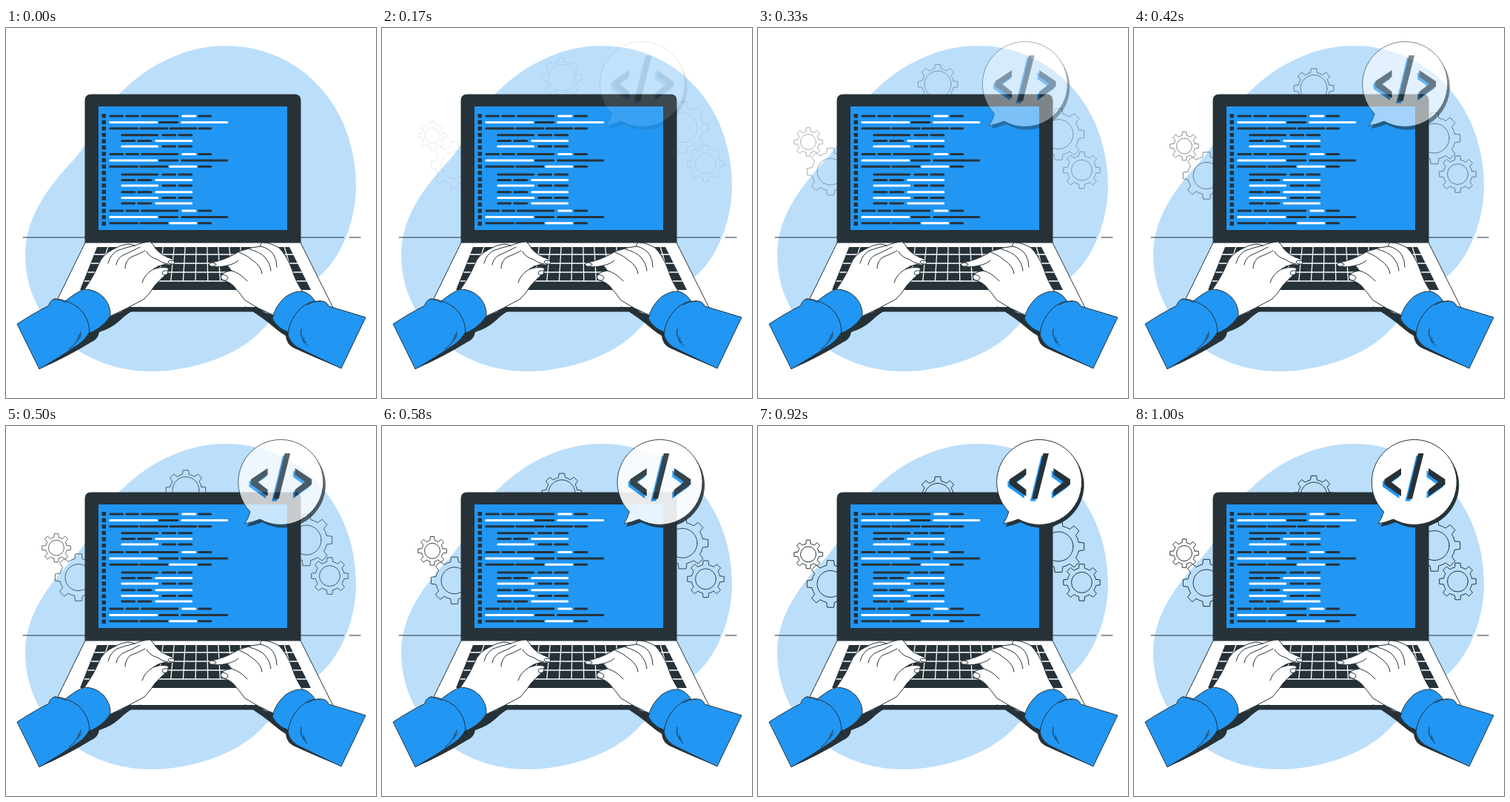
Animation, 500 px wide and 500 px high, one loop 1.04 s. Source, as an HTML page:

```html
<!DOCTYPE html>
<html lang="en">
<head>
<meta charset="utf-8">
<title>Typing on a laptop</title>
<style>
  html, body { margin: 0; width: 100%; height: 100%; overflow: hidden; background: #fff; }
  svg { display: block; width: 100%; height: 100%; }
  .dark { fill: #263238; }
  .blue { fill: #2196f3; }
  .line { fill: none; stroke: #263238; stroke-width: 1; stroke-linecap: round; stroke-linejoin: round; }
  .skin { fill: #fff; stroke: #263238; stroke-width: 1; stroke-linejoin: round; }
  .cloth { fill: #2196f3; stroke: #263238; stroke-width: 1; stroke-linejoin: round; }
</style>
</head>
<body>
<svg viewBox="0 0 500 500">
  <defs>
    <path id="balloon" d="M337.5 116 A57.5 57.5 0 1 1 350.5 126 Q341 130 330 132 Q335 125 337.5 116Z"/>
    <path id="glyphs" d="M361 57 L338.5 72 V79 L361 95 V86 L347.5 75.5 L361 66Z
      M384 37 H391.5 L376 98.5 H369Z
      M398 57 L420.5 72 V79 L398 95 V86 L411.5 75.5 L398 66Z"/>
  </defs>

  <path fill="#bbdefb" d="M296 24 C400 24 473 108 473 213 C473 262 452 312 423 336 C398 357 373 378 348 406
    C312 446 245 464 197 464 C100 464 26 395 26 306 C26 256 57 216 85 185 C121 149 123 114 161 81.5 C196 48 246 24 296 24Z"/>
  <path class="line" d="M23 283 H456.5 M464 283 H479"/>
  <g id="gears" class="line"></g>

  <g id="laptop">
    <path class="dark" d="M106.5 291 V98 Q106.500 89.500 115 89.500 H390 Q398.500 89.500 398.500 98 V291Z"/>
    <rect class="blue" x="125" y="106" width="255" height="167"/>
    <g id="code"></g>
    <path class="skin" d="M107 290 H398 L442 378 H64Z"/>
    <path class="dark" d="M64 377 H442 V380 Q442 383.5 438 383.5 H68 Q64 383.5 64 380Z"/>
    <path class="dark" d="M123 296 H383 L412 354 H100Z"/>
    <path id="keys" fill="none" stroke="#fff" stroke-width="1.3"/>
  </g>

  <g id="leftArm">
    <path class="dark" d="M140 388 L184 376 Q166 383 153 396 Q142 406 126 411 Q124 421 116 424 Q80 446 45 461 L110 412Z"/>
    <path class="skin" d="M104 356 Q118 337 125 320 Q130 306 145 299 Q155 293 164 292 Q170 292 174 294 Q186 289 195 289
      Q199 292 202 298 Q209 307 225 312.5 Q229 315 227.5 318 Q225 321 214 319.5 Q205 321 199 326 Q208 322 218 324 Q220 325 219 328
      Q220 332 215 334 Q208 340 201 348 Q194 359 187 366 Q166 378 140 390Z"/>
    <path class="line" d="M138 318 Q141 306 150 301 Q160 297 174 294 M149 320 Q150 312 158 307 Q170 302 181 296
      M161 325 Q161 316 168 310 Q179 306 188 301 M190 302 Q194 310 205 313 Q211 318 219 319
      M184 344 Q187 333 199 326 M219 328 Q211 327 211 331 Q212 334 215 334 M227 315 Q220 313 219 316 Q220 319 225 319"/>
    <path class="cloth" d="M80 369 Q95 357 106 353 Q121 353 132 364 Q142 376 141 389 Q135 399 126 405 Q118 411 110 413Z"/>
    <path class="cloth" d="M15 400 Q38 385 58 375 Q59 368 66 366 Q83 367 98 378 Q112 391 113 410 Q108 421 96 429 Q72 445 45 461Z"/>
    <path class="line" d="M66 366 Q74 366 81 371 M97 422 Q102 417 101 411 M85 434 Q97 426 99 414"/>
  </g>

  <g id="rightArm">
    <path class="dark" d="M322 376 L362 388 L388 412 L453 460 Q414 444 388 432 Q379 427 378 416 Q371 412 364 406 Q348 392 322 376Z"/>
    <path class="skin" d="M402 358 Q391 342 387 328 Q380 308 369 297 Q357 290 347 290 Q343 291 344 295 Q334 296 325 299
      Q315 301 308 306 Q294 314 277 317 Q273 319 276 322 Q286 324 299 321 L305 328 Q296 329 292 333
      Q288 338 294 341 Q302 343 307 348 Q315 357 323 368 Q340 379 361 388Z"/>
    <path class="line" d="M344 295 Q357 298 362 307 Q366 314 366 323 M329 299 Q344 303 350 310 Q357 318 358 328
      M315 303 Q327 308 335 315 Q345 323 346 332 M299 321 Q309 319 314 314 M305 328 Q316 331 326 342
      M292 333 Q300 334 300 338 Q299 342 294 341 M277 317 Q284 317 284 320 Q282 323 276 322"/>
    <path class="cloth" d="M418 370 Q412 359 401 356 Q390 355 378 363 Q363 376 360 393 Q364 401 373 407 Q380 411 389 413Z"/>
    <path class="cloth" d="M486 391 Q460 383 436 376 Q434 369 425 369 Q409 368 397 380 Q383 394 381 414 Q383 424 393 431 Q421 445 453 460Z"/>
    <path class="line" d="M425 369 Q415 369 407 374 M399 407 Q396 419 407 429 M402 418 Q402 423 405 425"/>
  </g>

  <g id="bubble">
    <use href="#balloon" class="dark" x="3" y="4"/>
    <use href="#balloon" class="skin"/>
    <use href="#glyphs" class="blue" x="-2.5" y="3"/>
    <use href="#glyphs" class="dark"/>
  </g>
</svg>
<script>
const DARK = '#263238', WHITE = '#fff';
const byId = id => document.getElementById(id);

function add(parent, tag, attrs) {
  const el = document.createElementNS('http://www.w3.org/2000/svg', tag);
  for (const name in attrs) el.setAttribute(name, attrs[name]);
  parent.append(el);
}

// Gears: centre, tip radius, body radius, hole radius
function gear(cx, cy, tip, body, hole) {
  const point = (r, a) => `${(cx + r * Math.cos(a)).toFixed(2)} ${(cy + r * Math.sin(a)).toFixed(2)}`;
  const points = [];
  for (let i = 0; i < 8; i++) {
    const a = i * Math.PI / 4;
    points.push(point(body, a - .21), point(tip, a - .14), point(tip, a + .14), point(body, a + .21));
  }
  let d = 'M' + points[0];
  for (let i = 1; i <= points.length; i++) {
    const next = points[i % points.length];
    d += i % 4 ? `L${next}` : `A${body} ${body} 0 0 1 ${next}`;
  }
  add(byId('gears'), 'path', { d: d + 'Z' });
  add(byId('gears'), 'circle', { cx, cy, r: hole });
}
gear(243, 94, 27, 21.5, 18);
gear(98, 212, 32, 25.5, 18);
gear(68, 172, 19.5, 14.5, 10.5);
gear(406, 161.5, 35, 28, 20);
gear(437.5, 210, 25, 19.5, 14);

// Code rows: bar ends, and one colour letter per bar
const layouts = {
  a: [140, 158, 162, 179, 183, 232, 238, 256, 260, 277],
  b: [140, 204, 207, 232, 237, 299],
  c: [140, 178, 181, 218, 221, 257, 260, 277],
  d: [156, 205, 211, 229, 233, 251],
  e: [156, 174, 178, 196, 202, 251]
};
const rows = [
  [119, 'a', 'dddwd'], [127.5, 'b', 'wdw'], [135.7, 'c', 'dddd'],
  [144.7, 'd', 'ddd'], [152.5, 'e', 'ddw'], [160, 'd', 'wdd'],
  [170.5, 'a', 'dddwd'], [179, 'b', 'wdd'], [187.3, 'c', 'ddwd'],
  [198, 'd', 'ddd'], [205.5, 'e', 'ddw'], [213, 'd', 'wdd'],
  [221.7, 'e', 'ddw'], [229.5, 'd', 'wdd'], [237, 'e', 'ddw'],
  [247, 'a', 'dddwd'], [255.5, 'b', 'wdd'], [263.8, 'c', 'ddwd']
];
rows.forEach(([y, key, tones], row) => {
  const ends = layouts[key];
  [...tones].forEach((tone, i) => add(byId('code'), 'path', {
    d: `M${ends[2 * i] + .8} ${y}H${ends[2 * i + 1] - .3}`,
    stroke: tone === 'w' ? WHITE : DARK, 'stroke-width': 3, 'stroke-linecap': 'round'
  }));
  add(byId('code'), 'rect', { x: 129.5, y: 116 + row * 8.56, width: 5.5, height: 5.5, fill: DARK });
});

// Key gaps converge towards the lid
function drawKeys() {
  const gapX = (i, y) => 257 - (y - 296) * .02 + i * (14.9 + (y - 296) * .039);
  let d = '';
  for (const y of [306, 318, 330, 342]) d += `M${gapX(-9, y)} ${y}H${gapX(9, y)}`;
  for (let i = -8; i <= 8; i++) {
    const bottom = Math.abs(i) > 4 ? 354 : 342;
    d += `M${gapX(i, 296)} 296L${gapX(i, bottom)} ${bottom}`;
  }
  byId('keys').setAttribute('d', d);
}
drawKeys();

const LOOP = 1040, RATE = 24, LEAD = .005, TRAVEL = 30;
const cubic = (a, b, s) => 3 * (1 - s) ** 2 * s * a + 3 * (1 - s) * s * s * b + s ** 3;

// Easing with a small overshoot
function ease(x) {
  let low = 0, high = 1;
  for (let i = 0; i < 24; i++) {
    const mid = (low + high) / 2;
    if (cubic(.36, .5, mid) < x) low = mid; else high = mid;
  }
  return cubic(-.01, 1.38, high);
}

// Steps begin on whole hundredths of a second
function stepAt(ms) {
  const step = Math.floor((ms + 5) * RATE / 1000);
  return Math.round(step * 100 / RATE) * 10 > ms ? step - 1 : step;
}

function draw(ms) {
  const step = stepAt(ms % LOOP);
  const p = step < 3 ? 0 : ease(Math.min(1, step / RATE + LEAD));
  const shift = (p - 1) * TRAVEL;
  for (const [id, x, y] of [['gears', 0, shift], ['bubble', shift, 0]]) {
    byId(id).setAttribute('transform', `translate(${x} ${y})`);
    byId(id).setAttribute('opacity', Math.min(1, p));
  }
}

const start = performance.now();
function tick() {
  draw(performance.now() - start);
  requestAnimationFrame(tick);
}
tick();
</script>
</body>
</html>
```
